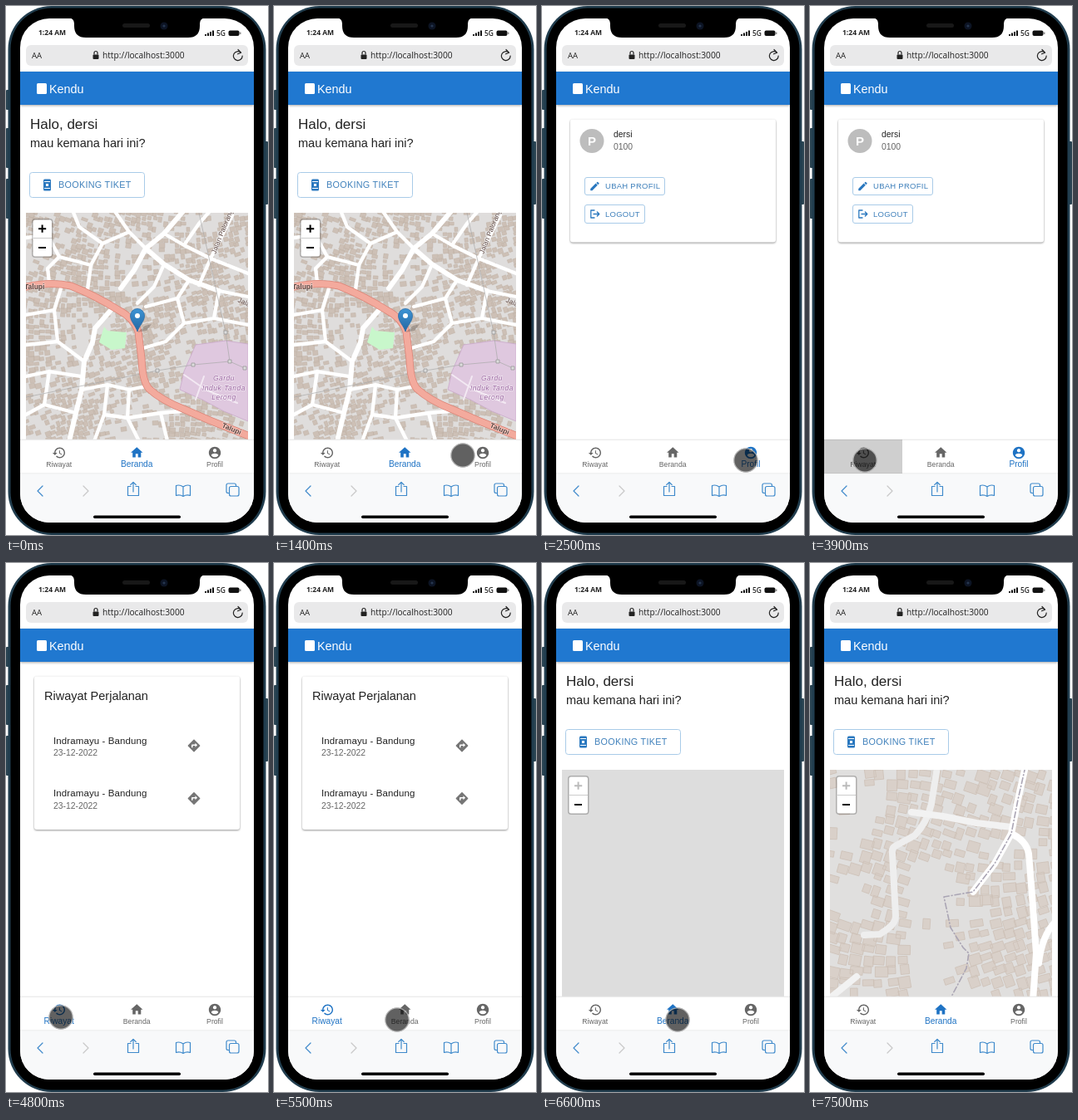
Recreate the animation shown at these times as an HTML page. Size 315 by 637 pixels, loop 8.1 s.

```html
<!DOCTYPE html>
<html lang="id">
<head>
<meta charset="utf-8">
<title>Bus ticket app</title>
<style>
html, body { margin: 0; width: 100%; height: 100%; overflow: hidden; background: #fff; }
svg { display: block; }
text { font-family: "Liberation Sans", Arial, sans-serif; fill: #222; }
.ui { font-family: "Open Sans", "Noto Sans", sans-serif; }
.sub { fill: #666; }
.btn text, .btn .solid { fill: #2a78bf; }
.btn rect.edge { fill: #fff; stroke: #a9cbe8; }
.btn text { letter-spacing: .028em; fill: #3f80bb; }
.line { fill: none; stroke-linecap: round; stroke-linejoin: round; }
.card { fill: #fff; filter: drop-shadow(0 1px 1.3px rgba(0,0,0,.42)); }
.road { stroke: #fff; }
.place { font-size: 8.5px; fill: #5b4540; stroke: #fff; stroke-width: 1.2px; stroke-opacity: .5; paint-order: stroke; }
.bold { font-weight: bold; }
.site text { fill: #9d68a3; font: italic 8.5px "Liberation Sans", Arial, sans-serif; letter-spacing: .5px; text-anchor: middle; }

/* everything changes in held steps on one shared 8.1 s clock */
.page, .tile, .plus, .tab, .tab text, #press, #touch { animation: 8.1s step-end infinite; }
.tab { color: #666; }
.tab text { font-size: 8.7px; fill: currentColor; text-anchor: middle; }
.home { animation-name: home; }
.profile { animation-name: profile; }
.history { animation-name: history; }
.far { animation-name: far; }
.near { animation-name: near; }
.plus { animation-name: plus; }
.t-home { animation-name: home-on; }
.t-home text { animation-name: home-grow; }
.t-profile { animation-name: profile-on; }
.t-profile text { animation-name: profile-grow; }
.t-history { animation-name: history-on; }
.t-history text { animation-name: history-grow; }
#press { animation-name: press; opacity: 0; }
#touch { animation-name: touch; opacity: 0; }

@keyframes home { 0% { opacity: 1 } 29.62% { opacity: 0 } 79.01% { opacity: 1 } }
@keyframes profile { 0% { opacity: 0 } 29.62% { opacity: 1 } 49.38% { opacity: 0 } }
@keyframes history { 0% { opacity: 0 } 49.38% { opacity: 1 } 79.01% { opacity: 0 } }
@keyframes far { 0% { opacity: 1 } 29.62% { opacity: 0 } }
@keyframes near { 0% { opacity: 0 } 88.88% { opacity: .5 } 92.59% { opacity: 1 } }
@keyframes plus { 0% { fill: #000 } 79.01% { fill: #bbb } }
@keyframes home-on { 0% { color: #1f73c4 } 29.62% { color: #666 } 79.01% { color: #1f73c4 } }
@keyframes profile-on { 0% { color: #666 } 29.62% { color: #1f73c4 } 49.38% { color: #666 } }
@keyframes history-on { 0% { color: #666 } 49.38% { color: #1f73c4 } 79.01% { color: #666 } }
@keyframes home-grow { 0% { font-size: 10.2px } 29.62% { font-size: 9.4px } 30.86% { font-size: 8.7px } 79.01% { font-size: 9.4px } 80.24% { font-size: 10.2px } }
@keyframes profile-grow { 0% { font-size: 8.7px } 29.62% { font-size: 9.4px } 30.86% { font-size: 10.2px } 49.38% { font-size: 9.4px } 50.61% { font-size: 8.7px } }
@keyframes history-grow { 0% { font-size: 8.7px } 49.38% { font-size: 9.4px } 50.61% { font-size: 10.2px } 79.01% { font-size: 9.4px } 80.24% { font-size: 8.7px } }
@keyframes press {
  0%, 29.62%, 49.38%, 79.01% { opacity: 0 }
  28.39% { opacity: .19; transform: translate(187px, 0) }
  48.14% { opacity: .19; transform: none }
  77.77% { opacity: .19; transform: translate(93.5px, 0) }
}
@keyframes touch {
  0% { opacity: 0; transform: translate(170px, 505px) }
  14.81% { opacity: 1; transform: translate(170px, 505px) }
  16.04% { opacity: 1; transform: translate(205px, 528px) }
  17.28% { opacity: 1; transform: translate(227px, 541px) }
  18.51% { opacity: 1; transform: translate(240px, 546px) }
  19.75% { opacity: 1; transform: translate(245px, 547px) }
  35.8% { opacity: 1; transform: translate(222px, 547px) }
  37.03% { opacity: 1; transform: translate(155px, 546px) }
  38.27% { opacity: 1; transform: translate(90px, 547px) }
  39.5% { opacity: 1; transform: translate(66px, 547px) }
  65.43% { opacity: 1; transform: translate(78px, 548px) }
  66.66% { opacity: 1; transform: translate(118px, 549px) }
  67.9% { opacity: 1; transform: translate(148px, 550px) }
  70.37% { opacity: 1; transform: translate(157px, 550px) }
  74.07% { opacity: 1; transform: translate(161px, 550px) }
  75.3% { opacity: 1; transform: translate(163px, 550px) }
  83.95% { opacity: 1; transform: translate(190px, 562px) }
  85.18% { opacity: 1; transform: translate(245px, 590px) }
  86.41% { opacity: 0; transform: translate(300px, 615px) }
}
</style>
</head>
<body>
<svg width="315" height="637" viewBox="0 0 315 637">
<defs>
  <clipPath id="mapBox"><rect x="24" y="249" width="267" height="273"/></clipPath>
  <linearGradient id="pin" x1="0" y1="0" x2="0" y2="1"><stop offset="0" stop-color="#3d94d4"/><stop offset="1" stop-color="#2466a2"/></linearGradient>
  <path id="turn" transform="scale(.74) translate(-12 -12)" fill="#757575" d="M21.71 11.29l-9-9c-.39-.39-1.02-.39-1.41 0l-9 9c-.39.39-.39 1.02 0 1.41l9 9c.39.39 1.02.39 1.41 0l9-9c.39-.38.39-1.01 0-1.41zM14 14.5V12h-4v3H8v-4c0-.55.45-1 1-1h5V7.5l3.5 3.5z"/>
  <path id="artery" class="line" d="M20 339Q52 331 78 337Q108 349 135 366Q154 376 159 392L163 425Q164 452 172 461Q187 475 215 486L245 499L295 519"/>
</defs>

<!-- phone body -->
<g fill="#2a4452">
  <rect x="0" y="101" width="4" height="24" rx="1"/><rect x="0" y="147" width="4" height="48" rx="1"/>
  <rect x="0" y="208" width="4" height="48" rx="1"/><rect x="311" y="163" width="4" height="76" rx="1"/>
</g>
<rect x="2.5" y="0" width="310" height="637" rx="52" fill="#213d4e"/>
<rect x="5.5" y="2.5" width="304" height="632" rx="49" fill="#000"/>
<rect x="17" y="15" width="281" height="607" rx="35" fill="#fff"/>
<path d="M75 14q7 1 7 7v3q0 14 14 14h123q14 0 14-14v-3q0-6 7-7z"/>
<rect x="140" y="21" width="33" height="5" rx="2.5" fill="#181818"/>
<circle cx="190" cy="24" r="4.5" fill="#0c1424"/><circle cx="190" cy="24" r="1.6" fill="#26364f"/>

<!-- status and address bars -->
<text class="ui" x="39" y="35" font-size="8.5" font-weight="bold">1:24 AM</text>
<path d="M240 36v-2M243 36v-3.5M246 36v-5M249 36v-6.5" stroke="#111" stroke-width="2"/>
<text class="ui" x="253" y="36" font-size="8.5" font-weight="600">5G</text>
<rect x="267.5" y="29.5" width="13" height="6.5" rx="2" fill="#111"/><rect x="281.2" y="31.5" width="1.2" height="2.5" fill="#777"/>
<rect x="24" y="47" width="267" height="25" rx="6" fill="#e9e9ea"/>
<text class="ui" x="31" y="63" font-size="9.5">AA</text>
<rect x="104.5" y="58.5" width="7" height="5.5" rx="1" fill="#222"/><path class="line" d="M106 58v-1.5a2 2 0 0 1 4 0V58" stroke="#222" stroke-width="1.2"/>
<text class="ui" x="116" y="63" font-size="10.2">http://localhost:3000</text>
<path class="line" d="M282.5 56.2a5.4 5.4 0 1 0 1.7 3.8M279 52.5l3.6 3.7-4 1.6" stroke="#222" stroke-width="1.2"/>

<!-- home -->
<g class="page home">
  <text x="29" y="148" font-size="17">Halo, dersi</text>
  <text x="29" y="170" font-size="14.5">mau kemana hari ini?</text>
  <g class="btn">
    <rect class="edge" x="28.5" y="200.5" width="138" height="30" rx="3"/>
    <rect class="solid" x="45" y="208.5" width="9" height="14" rx="1.5"/>
    <path d="M46 211h7v1h-7zM46 219h7v1h-7zM48 214h3v3h-3z" fill="#fff"/>
    <text x="63" y="218.5" font-size="10.8">BOOKING TIKET</text>
  </g>
  <g clip-path="url(#mapBox)">
    <rect x="24" y="249" width="267" height="273" fill="#ddd"/>
    <g class="tile far">
      <rect x="24" y="249" width="267" height="273" fill="#dfdddc"/>
      <path id="smallBlocks" fill="#cdc0b6" stroke="#bfb0a5" stroke-width=".5"/>
      <path d="M209 462L214 440L228 408L264 403L291 407V500L262 488L236 474z" fill="#dfc8df" stroke="#c9a9cb" stroke-width=".8"/>
      <path class="line" d="M214 444L240 462L278 478M228 474L238 446" stroke="#f3e9f3" stroke-width="2"/>
      <path d="M118 386L122 391L145 393L143 412L127 414L112 405z" fill="#c8f7cb"/>
      <g class="line road" stroke-width="6">
        <path d="M128 364L107 388L104 405L94 428L91 462L84 490L76 524"/>
        <path d="M214 246L190 274L168 292L154 318L138 340M168 292L190 311L220 330L256 343"/>
      </g>
      <g class="line road" stroke-width="4.3">
        <path d="M130 246L148 272L168 292M148 272L116 286L102 312L98 342M24 279L50 276L64 302L102 312M64 302L50 316L52 333M80 246L88 266L116 286"/>
        <path d="M190 274L214 288L246 304L291 322M214 288L232 262L246 246M246 304L232 336M272 252L246 304M190 311L178 338L158 358"/>
        <path d="M168 362L206 352L220 330M206 352L214 382L192 404L165 412M214 382L250 376L291 384M250 376L256 343L291 350"/>
        <path d="M24 372L58 366L66 340M24 408L62 404L94 428M62 404L58 366M24 446L52 440L91 446M52 440L46 480L24 492M46 480L84 490"/>
        <path d="M91 462L122 456L148 462L168 458M122 456L118 492L106 524M148 462L146 496L160 524M118 492L146 496L186 490L210 488M186 490L194 524"/>
      </g>
      <g class="line" stroke="#aaa" stroke-width=".7">
        <path d="M24 471L182 439L225 432L269 428L287 436M232 249L264 393L269 428"/>
      </g>
      <path d="M180 437h4v4h-4zM223 430h4v4h-4zM267 426h4v4h-4zM285 434h4v4h-4zM262 391h4v4h-4z" fill="#ddd" stroke="#999" stroke-width=".8"/>
      <use href="#artery" stroke="#dc8578" stroke-width="9"/>
      <use href="#artery" stroke="#f3aa9d" stroke-width="7.4"/>
      <text class="place bold" x="22" y="341">Talupi</text>
      <text class="place bold" transform="translate(259 507) rotate(23)">Talupi</text>
      <text class="place" transform="translate(252 299) rotate(-68)">Jalan Palorang</text>
      <text class="place" transform="translate(278 356) rotate(24)">Jalan</text>
      <g class="site" stroke="#fff" stroke-width="1.3" stroke-opacity=".6" style="paint-order:stroke">
        <text x="262" y="451">Gardu</text>
        <text x="262" y="463">Induk Tanda</text>
        <text x="262" y="474">Lerong</text>
      </g>
      <path d="M158 393l9-8 8-2-6 8z" fill="#000" opacity=".2"/>
      <path d="M158 392c-2-7-8.500-12-8.500-19a8.500 8.500 0 0 1 17 0c0 7-6.500 12-8.500 19z" fill="url(#pin)" stroke="#2a6ca8" stroke-width=".8"/>
      <circle cx="158" cy="373" r="3" fill="#fff"/>
    </g>
    <g class="tile near">
      <rect x="24" y="249" width="267" height="273" fill="#e0dfde"/>
      <path id="bigBlocks" fill="#d9d0c9" stroke="#cdc0b6" stroke-width=".8"/>
      <g class="line road" stroke-width="8">
        <path d="M153 245L146 290Q141 312 126 328L102 341Q98 343 99 350L103 425Q103 433 94 440L84 447L65 448" stroke="#eee"/>
        <path d="M122 300L160 305L200 313L242 318M56 498L24 524" stroke="#f2f2f2"/>
        <path d="M259 245L250 285L242 326L222 362L196 396"/>
        <path d="M242 326Q260 334 263 350L267 400L272 470L268 526M295 432Q279 448 275 482"/>
      </g>
      <path class="line" d="M259 245L250 285L242 326L222 362L196 396L161 402L169 439L184 463L191 470L188 488L168 526" stroke="#aaa5b4" stroke-width="1.6" stroke-dasharray="7 3 1 3"/>
    </g>
    <rect x="31" y="256" width="25.5" height="47" rx="4" fill="#000" opacity=".22"/>
    <rect x="32.5" y="257.5" width="22.5" height="44" rx="2.5" fill="#fff"/>
    <path d="M32.5 279.5h22.5" stroke="#ccc"/>
    <path class="plus" d="M39 267.2h3.6v-3.6h2v3.6h3.6v2h-3.6v3.6h-2v-3.6H39z"/>
    <path d="M39 290h9v2h-9z"/>
  </g>
</g>

<!-- profile -->
<g class="page profile">
  <rect class="card" x="34" y="136.5" width="247" height="148" rx="3"/>
  <circle cx="60" cy="162.5" r="14.5" fill="#bdbdbd"/>
  <text x="60" y="168" font-size="15" font-weight="bold" text-anchor="middle" style="fill:#fff">P</text>
  <text x="86" y="158" font-size="10.4">dersi</text>
  <text class="sub" x="86" y="172.5" font-size="10.4">0100</text>
  <g class="btn" font-size="9.5">
    <rect class="edge" x="51.5" y="206.5" width="96" height="21" rx="2.5"/>
    <path class="solid" transform="translate(56.5 210) scale(.58)" d="M3 17.25V21h3.75L17.81 9.94l-3.75-3.75zM20.71 7.04c.39-.39.39-1.02 0-1.41l-2.34-2.34a1 1 0 0 0-1.41 0l-1.83 1.83 3.75 3.75z"/>
    <text x="76" y="220.3">UBAH PROFIL</text>
    <rect class="edge" x="51.5" y="239.5" width="72" height="22" rx="2.5"/>
    <path class="line" d="M63 246h-4.2v9H63M62 250.5h6.5M66.3 248l2.5 2.5-2.5 2.5" stroke="#2a78bf" stroke-width="1.3"/>
    <text x="76" y="254">LOGOUT</text>
  </g>
</g>

<!-- history -->
<g class="page history">
  <rect class="card" x="34" y="136.5" width="247" height="184.5" rx="3"/>
  <text x="46" y="165" font-size="14.5">Riwayat Perjalanan</text>
  <g id="trip">
    <text x="57" y="217.5" font-size="11.5" letter-spacing=".1">Indramayu - Bandung</text>
    <text class="sub" x="57" y="232" font-size="10.4">23-12-2022</text>
    <use href="#turn" transform="translate(226 220)"/>
  </g>
  <use href="#trip" y="63.5"/>
</g>

<!-- app header -->
<rect x="17" y="79" width="281" height="40" fill="#2078d0" style="filter:drop-shadow(0 1.5px 1.5px rgba(0,0,0,.35))"/>
<rect x="37" y="93" width="12" height="13" rx="1.5" fill="#fff"/>
<text x="52" y="105" font-size="14.4" style="fill:#fff">Kendu</text>

<!-- tabs -->
<rect x="17" y="522" width="281" height="41" fill="#fff"/>
<path d="M17 522.2h281M17 563h281" stroke="#e4e4e4"/>
<g class="tab t-history">
  <path transform="translate(55.2 529.4) scale(.72)" fill="currentColor" d="M13 3c-4.97 0-9 4.03-9 9H1l3.89 3.89.07.14L9 12H6c0-3.87 3.13-7 7-7s7 3.13 7 7-3.13 7-7 7c-1.93 0-3.68-.79-4.94-2.06l-1.42 1.42C8.27 19.99 10.51 21 13 21c4.97 0 9-4.03 9-9s-4.03-9-9-9zm-1 5v5l4.28 2.54.72-1.21-3.5-2.08V8z"/>
  <text x="63.7" y="555">Riwayat</text>
</g>
<g class="tab t-home">
  <path transform="translate(148.6 529.2) scale(.72)" fill="currentColor" d="M10 20v-6h4v6h5v-8h3L12 3 2 12h3v8z"/>
  <text x="157.2" y="555">Beranda</text>
</g>
<g class="tab t-profile">
  <path transform="translate(242.4 529.4) scale(.72)" fill="currentColor" d="M12 2C6.48 2 2 6.48 2 12s4.48 10 10 10 10-4.48 10-10S17.52 2 12 2zm0 3c1.66 0 3 1.34 3 3s-1.34 3-3 3-3-1.34-3-3 1.34-3 3-3zm0 14.2c-2.5 0-4.71-1.28-6-3.22.03-1.99 4-3.08 6-3.08s5.97 1.09 6 3.08c-1.29 1.94-3.5 3.22-6 3.22z"/>
  <text x="251" y="555">Profil</text>
</g>
<rect id="press" x="17" y="522" width="94" height="41"/>

<!-- browser toolbar -->
<path d="M17 563.5h281V587a35 35 0 0 1-35 35H52a35 35 0 0 1-35-35z" fill="#f8f9fa"/>
<g class="line" stroke="#3f8acb" stroke-width="1.2">
  <path d="M44 578l-6 6 6 6"/>
  <path d="M93 578l6 6-6 6" stroke="#c8c8c8"/>
  <path d="M150 578.5h-3.5v11h13v-11H156M153 585v-11.5M149.8 576.5l3.200-3.200 3.200 3.200"/>
  <path d="M213 579q-4-3-8.5-1.5v12q4.5-1.5 8.5 1q4-2.5 8.5-1v-12Q217 576 213 579v11"/>
  <rect x="268.5" y="578.5" width="11.5" height="11.5" rx="2"/>
  <path d="M268.5 586.5H267a2 2 0 0 1-2-2V577a2 2 0 0 1 2-2h7.5a2 2 0 0 1 2 2v1.5"/>
</g>
<rect x="105" y="613.5" width="105" height="3.5" rx="1.7"/>

<g id="touch">
  <circle r="14.5" opacity=".62"/>
  <circle r="14.2" fill="none" stroke="#c4c4c4" stroke-opacity=".8" stroke-width="1.3"/>
</g>
</svg>
<script>
function seeded(seed) {
  return () => (seed = (seed * 16807) % 2147483647) / 2147483647;
}

// Path data for rotated houses scattered on a loose grid over the map.
function houses(cell, seed, density) {
  const rand = seeded(seed);
  let d = "";
  for (let gy = 246; gy < 526; gy += cell) {
    for (let gx = 20; gx < 296; gx += cell) {
      const x = gx + rand() * cell * 0.3, y = gy + rand() * cell * 0.3;
      const w = cell * (0.6 + rand() * 0.55), h = cell * (0.5 + rand() * 0.5);
      if (rand() > density(x, y)) continue;
      const a = 0.35 * Math.sin(x / 90 + y / 70 + seed);
      const c = Math.cos(a), s = Math.sin(a), r = v => v.toFixed(1);
      d += `M${r(x)} ${r(y)}l${r(w * c)} ${r(w * s)} ${r(-h * s)} ${r(h * c)} ${r(-w * c)} ${r(-w * s)}z`;
    }
  }
  return d;
}

const inside = (x, y, cx, cy, rx, ry) => ((x - cx) / rx) ** 2 + ((y - cy) / ry) ** 2 < 1;
const patchy = (x, y) => 0.62 + 0.35 * Math.sin(x / 23 + 1) * Math.sin(y / 29);
const gaps = (x, y) =>
  inside(x, y, 148, 440, 38, 95) || inside(x, y, 50, 285, 34, 40) || inside(x, y, 48, 395, 28, 36)
    ? 0.05 : 0.82 + 0.25 * Math.sin(x / 31) * Math.sin(y / 37 + 2);

document.getElementById("smallBlocks").setAttribute("d", houses(6.5, 41, patchy));
document.getElementById("bigBlocks").setAttribute("d", houses(14, 77, gaps));
</script>
</body>
</html>
```
